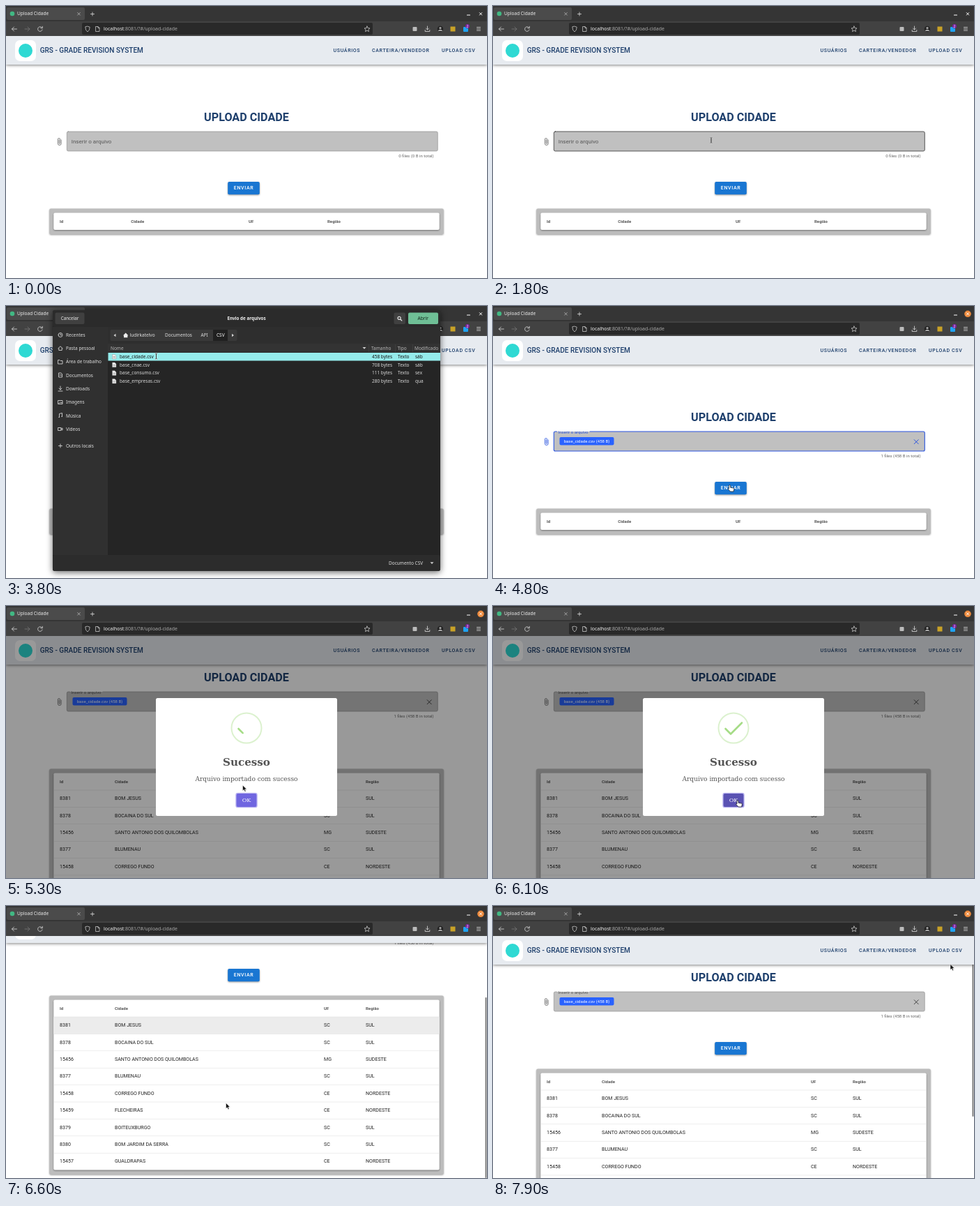
Recreate the animation shown at these times as an HTML page. Size 690 by 390 pixels, loop 8000 ms.

```html
<!DOCTYPE html>
<html lang="pt">
<head>
<meta charset="utf-8">
<style>
  html, body { margin: 0; width: 100%; height: 100%; overflow: hidden; background: #fff; }
  svg { display: block; font-family: Roboto, sans-serif; }
  text { white-space: pre; }
  .ui { font-family: "Noto Sans", sans-serif; }
  .serif { font-family: "DejaVu Serif", serif; }
  .btn { font-weight: 500; letter-spacing: .0893em; }
  .line { fill: none; stroke-linecap: round; stroke-linejoin: round; }
  .lift { filter: drop-shadow(0 1px 1.2px rgba(0,0,0,.4)); }
  .window { filter: drop-shadow(0 2px 5px rgba(0,0,0,.6)); }
</style>
</head>
<body>
<svg id="stage" width="690" height="390" viewBox="0 0 690 390"></svg>
<script>
const LOOP = 8000, ROW = 24.4, SHIFT = 57, MAX_SCROLL = 105;
const NAVY = '#1f406d';

// Text is placed by its left edge and the vertical centre of its capitals.
const text = (x, y, size, str, attrs = '') =>
  `<text x="${x}" y="${y + size * .355}" font-size="${size}" ${attrs}>${str}</text>`;
const rect = (x, y, w, h, fill, attrs = '') =>
  `<rect x="${x}" y="${y}" width="${w}" height="${h}" fill="${fill}" ${attrs}/>`;
const circle = (x, y, r, fill, attrs = '') =>
  `<circle cx="${x}" cy="${y}" r="${r}" fill="${fill}" ${attrs}/>`;
const line = (d, stroke, width = .8, attrs = '') =>
  `<path class="line" d="${d}" stroke="${stroke}" stroke-width="${width}" ${attrs}/>`;
const shape = (d, fill, attrs = '') => `<path d="${d}" fill="${fill}" ${attrs}/>`;
const group = (id, body, attrs = '') => `<g id="${id}" ${attrs}>${body}</g>`;
const ui = (x, y, str, fill = '#dedede', size = 6.5, attrs = '') =>
  text(x, y, size, str, `class="ui" fill="${fill}" ${attrs}`);
const cross = (x, y, r, stroke, width) =>
  line(`M${x - r} ${y - r}l${2 * r} ${2 * r}m0 ${-2 * r}l${-2 * r} ${2 * r}`, stroke, width);

function browser() {
  const c = '#dcdcdc';
  return rect(0, 0, 690, 23, '#353535') + rect(1, 2, 112, 18, '#4b4b4b', 'rx="2"') +
    rect(0, 22, 690, 21, '#424242') + rect(109, 24, 417, 17, '#292929', 'rx="2"') +
    circle(9, 11, 3.3, '#41b883') + ui(16, 11, 'Upload Cidade', '#ededed', 6.55) +
    cross(104.5, 11.3, 1.8, '#ccc', .7) + line('M121.5 11.5h5m-2.5-2.5v5', c) +
    line('M15.5 33h-7m3-3l-3 3l3 3', c) + line('M27 33h7m-3-3l3 3l-3 3', '#777') +
    line('M51.5 31a3.3 3.3 0 1 0 .6 3M52.3 29.3v2.4h-2.4', c) +
    line('M117 29.2l3.2 1q0 5-3.2 6.8q-3.2-1.8-3.2-6.8z', c, .7) +
    line('M129 29.5h3l2 2v5h-5zM132 29.5v2h2', c, .7) +
    ui(140, 33, 'localhost<tspan fill="#a9a9a9">:8081/?#/upload-cidade</tspan>', '#f2f2f2', 6.93) +
    line('M518 29l1.2 2.6l2.8.3l-2.1 1.9l.6 2.8l-2.5-1.4l-2.5 1.4l.6-2.8l-2.1-1.9l2.8-.3z', c, .7) +
    rect(583.5, 30, 6, 6, '#bbb', 'rx="1"') +
    line('M604.5 29v5m-2-2l2 2l2-2M601.2 34.5v2h6.6v-2', c) +
    circle(623, 33, 4.2, '#222') + circle(623, 31.5, 1.6, '#aaa') + shape('M619.8 36a3.3 3 0 0 1 6.4 0z', '#aaa') +
    rect(637.5, 29.5, 7, 7, '#c9a227') + rect(656, 30, 7, 7, '#1fa3f2', 'rx="1"') +
    circle(662, 29, 3, '#7a1fa0') + ui(660.5, 29, '2', '#fff', 4.8) +
    line('M675.5 30.5h5m-5 2.3h5m-5 2.3h5', c) +
    line('M661.5 13h4', '#fff', 1.1) + group('active', circle(681, 11.3, 4.8, '#ee8a3c')) +
    cross(681, 11.3, 1.7, '#fff', 1);
}

function appBar() {
  const nav = [[469.5, 'USUÁRIOS'], [525, 'CARTEIRA/VENDEDOR'], [625, 'UPLOAD CSV']];
  return rect(0, 40, 690, 44, '#e7ebf0', 'style="filter:drop-shadow(0 1px 2px rgba(0,0,0,.5))"') +
    rect(13, 49, 30, 30, '#fff', 'rx="7"') + circle(28, 64, 10, '#2fd9d3') +
    text(48.7, 63.5, 10.1, 'GRS - GRADE REVISION SYSTEM', `fill="${NAVY}" font-weight="500"`) +
    nav.map(([x, s]) => text(x, 63.5, 7.07, s, `class="btn" fill="${NAVY}"`)).join('');
}

function table(columns, rows) {
  const inner = ROW * (rows.length + 1);
  const xs = columns, top = 296.6;
  const heads = ['Id', 'Cidade', 'UF', 'Região'];
  return rect(62.3, 290.6, 565.4, inner + 12.2, '#bdbdbd', 'rx="2" class="lift"') +
    rect(68.3, top, 553.4, inner, '#fff', 'rx="2" class="lift"') +
    (rows.length ? rect(68.3, top + ROW, 553.4, ROW, '#ececec', 'id="hover"') : '') +
    heads.map((h, i) => text(xs[i], 308.6, 6.06, h, 'font-weight="700" fill="#555"')).join('') +
    rows.map((row, r) => rect(68.3, top + ROW * (r + 1) - .25, 553.4, .5, '#dcdcdc') +
      row.split('|').map((s, i) => text(xs[i], 308.3 + ROW * (r + 1), 7.07, s, 'fill="#222"')).join('')
    ).join('');
}

const CITIES = ['8381|BOM JESUS|SC|SUL', '8378|BOCAINA DO SUL|SC|SUL',
  '15456|SANTO ANTONIO DOS QUILOMBOLAS|MG|SUDESTE', '8377|BLUMENAU|SC|SUL',
  '15458|CORREGO FUNDO|CE|NORDESTE', '15459|FLECHEIRAS|CE|NORDESTE',
  '8379|BOITEUXBURGO|SC|SUL', '8380|BOM JARDIM DA SERRA|SC|SUL', '15457|GUALDRAPAS|CE|NORDESTE'];

function content() {
  return text(345, 159.6, 16.16, 'UPLOAD CIDADE', `font-weight="700" text-anchor="middle" fill="${NAVY}"`) +
    line('M79.2 192v5.2a2.4 2.4 0 0 1-4.8 0v-6a1.6 1.6 0 0 1 3.2 0v5.5a.8.8 0 0 1-1.6 0v-4.7', '#666', .8, 'id="clip"') +
    rect(87.3, 180, 532, 28, '#c0c0c0', 'rx="2"') +
    '<path id="border" class="line"/>' +
    '<text id="label">Inserir o arquivo</text>' +
    group('file', rect(95.5, 188, 78, 11.5, '#2962ff', 'rx="2"') +
      text(101.7, 193.8, 6.06, 'base_cidade.csv (458 B)', 'fill="#fff"') +
      line('M604.2 191.7l6 6m0-6l-6 6', '#444', 1, 'id="clear"')) +
    text(613.5, 215, 6.06, '', 'id="count" text-anchor="end" fill="#666"') +
    rect(318.2, 252, 45.6, 18.2, '#1976d2', 'rx="2" class="lift"') +
    text(326.8, 260.8, 7.07, 'ENVIAR', 'class="btn" fill="#fff"') +
    group('empty', table([77, 179.3, 348, 461], [])) +
    group('full', table([77, 156, 456, 516], CITIES));
}

function modal() {
  return rect(215, 132, 260, 169, '#fff', 'rx="2.5"') +
    circle(345, 175, 21.5, 'none', 'stroke="#a5dc86" stroke-opacity=".4" stroke-width="2"') +
    line('M333.5 176l7.5 7.5l16-16', '#a5dc86', 2.6, 'id="check" pathLength="1" stroke-dasharray="1 2"') +
    text(345, 223.6, 15.15, 'Sucesso', 'class="serif" font-weight="700" fill="#545454" text-anchor="middle"') +
    text(345, 247.3, 9.09, 'Arquivo importado com sucesso', 'class="serif" fill="#545454" text-anchor="middle"') +
    rect(329.3, 267.8, 31.4, 21.4, '#b8b2f0', 'rx="3"') + rect(330.6, 269, 28.8, 19, '#7066e0', 'id="ok" rx="2"') +
    text(345, 278.5, 8.08, 'OK', 'class="serif" fill="#fff" text-anchor="middle"');
}

function dialog() {
  const c = '#d2d2d2';
  const icons = ['M75 41.5a3 3 0 1 0 6 0a3 3 0 1 0-6 0M78 39.8v1.8h1.5', 'M74.8 60.8l3.2-3l3.2 3M75.8 60.5v3h4.4v-3',
    'M75 77.5h2l1 1h3v4.5h-6z', 'M76 96h3l1.5 1.5v4.5H76zM77 99h2.4', 'M78 115v5m-2-2l2 2l2-2M75 122h6',
    'M75 135.5h6v5h-6zM75.5 140l2-2l1.5 1l1-1l1 1', 'M76.5 159.5v-5l4-1v5M75.8 159.5h.7m3.3-1h.7',
    'M75 174.5h4v4h-4zM79 176l2-1v3l-2-1', 'M75.5 200.5h5m-2.5-2.5v5'];
  const places = ['Recentes', 'Pasta pessoal', 'Área de trabalho', 'Documentos', 'Downloads', 'Imagens', 'Música', 'Vídeos', 'Outros locais'];
  const files = ['base_cidade.csv|458 bytes|Texto|sáb', 'base_cnae.csv|708 bytes|Texto|sáb',
    'base_consumo.csv|111 bytes|Texto|sex', 'base_empresas.csv|280 bytes|Texto|qua'];
  const cols = [163, 525, 562, 587];
  const fileRow = (f, i, fill) => {
    const y = 72.6 + 11.7 * i;
    return shape(`M152.5 ${y - 3.2}h3.5l2 2v4.6h-5.5z`, '#eee', 'stroke="#888" stroke-width=".4"') +
      line(`M153.8 ${y}h2.8m-2.8 1.5h2.8`, '#777', .5) +
      f.split('|').map((s, j) => ui(cols[j], y, s, fill)).join('');
  };
  return rect(67, 6, 556, 374, '#252525', 'rx="3" class="window"') +
    rect(67, 6, 556, 24, '#2b2b2b', 'rx="3"') + rect(67, 30, 79, 327, '#303030') +
    rect(146, 30, 477, 24, '#2e2e2e') + rect(146, 54, 477, 12.5, '#333') +
    rect(67, 357, 556, 23, '#2c2c2c', 'rx="3"') +
    rect(70.5, 9.5, 42, 16.5, '#404040', 'rx="2"') + ui(78.7, 17.7, 'Cancelar', '#eee', 6.3) +
    ui(345, 17.7, 'Envio de arquivos', '#f4f4f4', 6.3, 'font-weight="700" text-anchor="middle"') +
    rect(556.5, 9.5, 16.5, 16.5, '#404040', 'rx="2"') +
    line('M562 17.3a2.1 2.1 0 1 0 4.2 0a2.1 2.1 0 1 0-4.2 0M565.8 19l2 2', '#eee', 1.1) +
    rect(577, 9.5, 43, 16.5, '#444', 'id="open" rx="2"') + ui(598.3, 17.7, 'Abrir', '#fff', 6.6, 'id="openText" text-anchor="middle"') +
    places.map((p, i) => {
      const y = i < 8 ? 41.4 + 19.3 * i : 200.3;
      return line(icons[i], c, .9) + ui(86, y, p);
    }).join('') +
    rect(149.5, 34, 182, 16, '#393939', 'rx="2"') + rect(297, 34, 21, 16, '#202020') +
    shape('M157.5 39.7v4.6l-3-2.3z', c) + shape('M324 39.7v4.6l3-2.3z', c) +
    shape('M168 42.2l3.7-3.6l3.7 3.6h-1v3h-5.4v-3z', '#eee') +
    ui(177.5, 42, 'ludirkatelvo') + ui(228, 42, 'Documentos') + ui(279.5, 42, 'API') + ui(302, 42, 'CSV', '#fff') +
    [[150, 'Nome'], [524, 'Tamanho'], [561.5, 'Tipo'], [586, 'Modificado']].map(([x, s]) => ui(x, 60.3, s, '#b5b5b5')).join('') +
    [520.5, 558, 583].map(x => rect(x, 55, .5, 11, '#4a4a4a')).join('') +
    shape('M511.5 59h5l-2.5 2.8z', c) +
    files.map((f, i) => fileRow(f, i, '#d8d8d8')).join('') +
    group('picked', rect(146.5, 67, 476.5, 11.5, '#94ebeb') + fileRow(files[0], 0, '#151515')) +
    ui(549, 368.4, 'Documento CSV') + shape('M608.5 367.3h5l-2.5 2.8z', c);
}

const stage = document.getElementById('stage');
stage.innerHTML = rect(0, 0, 690, 390, '#fff') + group('content', content()) +
  rect(687.6, 43, 1.8, 259, '#707070', 'id="thumb" rx=".9"') + group('bar', appBar()) +
  rect(0, 43, 690, 347, '#000', 'id="shade"') + group('modal', modal()) +
  browser() + group('dialog', dialog()) +
  group('cursor',
    group('arrow', shape('M0 0v8l1.9-1.7l1.3 2.9l1.4-.6l-1.3-2.8h2.5z', '#111', 'stroke="#fff" stroke-width=".5"')) +
    group('beam', line('M-1.2-4q1.2 0 1.2.8v6.4q0 .8-1.2.8M1.2-4q-1.2 0-1.2.8v6.4q0 .8 1.2.8', '#fff', 1.5) +
      line('M-1.2-4q1.2 0 1.2.8v6.4q0 .8-1.2.8M1.2-4q-1.2 0-1.2.8v6.4q0 .8 1.2.8', '#222', .7)) +
    group('hand', shape('M-1 .2q1-1 2 0v3l4.6.9q.8.2.7 1.2l-.7 3.7h-4.6l-3.3-3.6q.2-1.3 1.3-.5z', '#fff', 'stroke="#111" stroke-width=".7"')));

const el = {};
stage.querySelectorAll('[id]').forEach(e => el[e.id] = e);

const span = (t, a, b) => Math.min(1, Math.max(0, (t - a) / (b - a)));
const ease = p => p * p * (3 - 2 * p);
const set = (id, attrs) => { for (const k in attrs) el[id].setAttribute(k, attrs[k]); };
const show = (id, opacity) => set(id, { opacity: +opacity, visibility: +opacity ? 'visible' : 'hidden' });
const zoom = s => `translate(345 216.5) scale(${s}) translate(-345 -216.5)`;

// time, x, y
const PATH = [[800, 336, 222], [1600, 316, 189], [1700, 316, 189], [1800, 313, 192.5], [2650, 313, 192.5],
  [3100, 215.5, 72], [3950, 215.5, 72], [4600, 339.5, 257], [5450, 339.5, 257], [5900, 351, 279],
  [6200, 351, 279], [6450, 315.5, 282.5], [7150, 315.5, 282.5], [7800, 656, 96], [7900, 656, 83.5]];
function pointer(t) {
  let i = PATH.findIndex(p => p[0] > t);
  if (i < 0) return PATH[PATH.length - 1].slice(1);
  if (i === 0) return PATH[0].slice(1);
  const [t0, x0, y0] = PATH[i - 1], [t1, x1, y1] = PATH[i], p = ease(span(t, t0, t1));
  return [x0 + (x1 - x0) * p, y0 + (y1 - y0) * p];
}

function popScale(t) {
  const p = span(t, 5000, 5300);
  if (p < .45) return .7 + .35 * p / .45;
  if (p < .8) return 1.05 - .1 * (p - .45) / .35;
  return .95 + .05 * (p - .8) / .2;
}

function draw(t) {
  const loaded = t >= 5000, chosen = t >= 3900, focused = chosen && !loaded;
  const scroll = MAX_SCROLL * (ease(span(t, 6450, 6600)) - ease(span(t, 7000, 7200)));
  const hide = span(t, 6500, 6650) - span(t, 7030, 7180);
  const [x, y] = pointer(t);

  // Field
  const float = ease(span(t, 3900, 4050));
  const accent = focused ? '#2a55e0' : '#444';
  const over = t >= 1000 && t < 3900;
  set('border', {
    d: chosen ? 'M139 180H617.3q2 0 2 2v24q0 2-2 2H89.3q-2 0-2-2v-24q0-2 2-2H91.5'
      : 'M89.3 180H617.3q2 0 2 2v24q0 2-2 2H89.3q-2 0-2-2v-24q0-2 2-2z',
    stroke: focused ? accent : over ? '#333' : '#858585', 'stroke-width': focused ? 1.1 : over ? .8 : .6
  });
  set('label', { x: 93.7 - .4 * float, y: 196.9 - 13.7 * float, 'font-size': 8.08 - 2.02 * float, fill: focused ? accent : '#555' });
  set('clip', { stroke: focused ? accent : '#666' });
  set('clear', { stroke: accent });
  show('file', chosen);
  el.count.textContent = chosen ? '1 files (458 B in total)' : '0 files (0 B in total)';

  // Page
  show('empty', !loaded);
  show('full', loaded);
  set('content', { transform: `translate(0 ${-scroll - (loaded ? SHIFT : 0)})` });
  set('bar', { transform: `translate(0 ${-46 * hide})` });
  show('thumb', t >= 6450);
  set('thumb', { y: 43 + 88 * scroll / MAX_SCROLL });
  const row = Math.floor((y + (t < 6650 ? 0 : scroll) - 264) / ROW);
  show('hover', t >= 6250 && row >= 0 && row < CITIES.length && x > 68 && x < 622);
  set('hover', { y: 296.6 + ROW * (row + 1) });

  // Success message
  const out = span(t, 6200, 6350);
  show('shade', .4 * (span(t, 5000, 5100) - span(t, 6200, 6300)));
  show('modal', span(t, 5000, 5080) * (1 - out));
  set('modal', { transform: zoom(out ? 1 - .5 * out : popScale(t)) });
  const drawn = ease(span(t, 5150, 5600));
  set('check', { 'stroke-dashoffset': 1 - drawn, opacity: drawn ? 1 : 0 });
  set('ok', { fill: t >= 5700 ? '#5a52b3' : '#7066e0' });

  // File chooser
  const opened = span(t, 2130, 2280);
  show('dialog', opened * (1 - span(t, 3850, 3950)));
  set('dialog', { transform: zoom(.9 + .1 * ease(opened)) });
  show('picked', t >= 3400);
  set('open', { fill: t >= 3600 ? '#6fbf96' : '#3a3a3a' });
  set('openText', { fill: t >= 3600 ? '#10251a' : '#888' });
  show('active', t >= 3900);

  // Pointer
  const beam = t >= 1000 && t < 3950;
  const hand = (t >= 4500 && t < 5000) || (t >= 5700 && t < 6250);
  set('cursor', { transform: `translate(${x} ${y})` });
  show('beam', beam);
  show('hand', hand);
  show('arrow', t >= 800 && !beam && !hand);
}

(function tick() {
  draw(performance.now() % LOOP);
  requestAnimationFrame(tick);
})();
</script>
</body>
</html>
```
